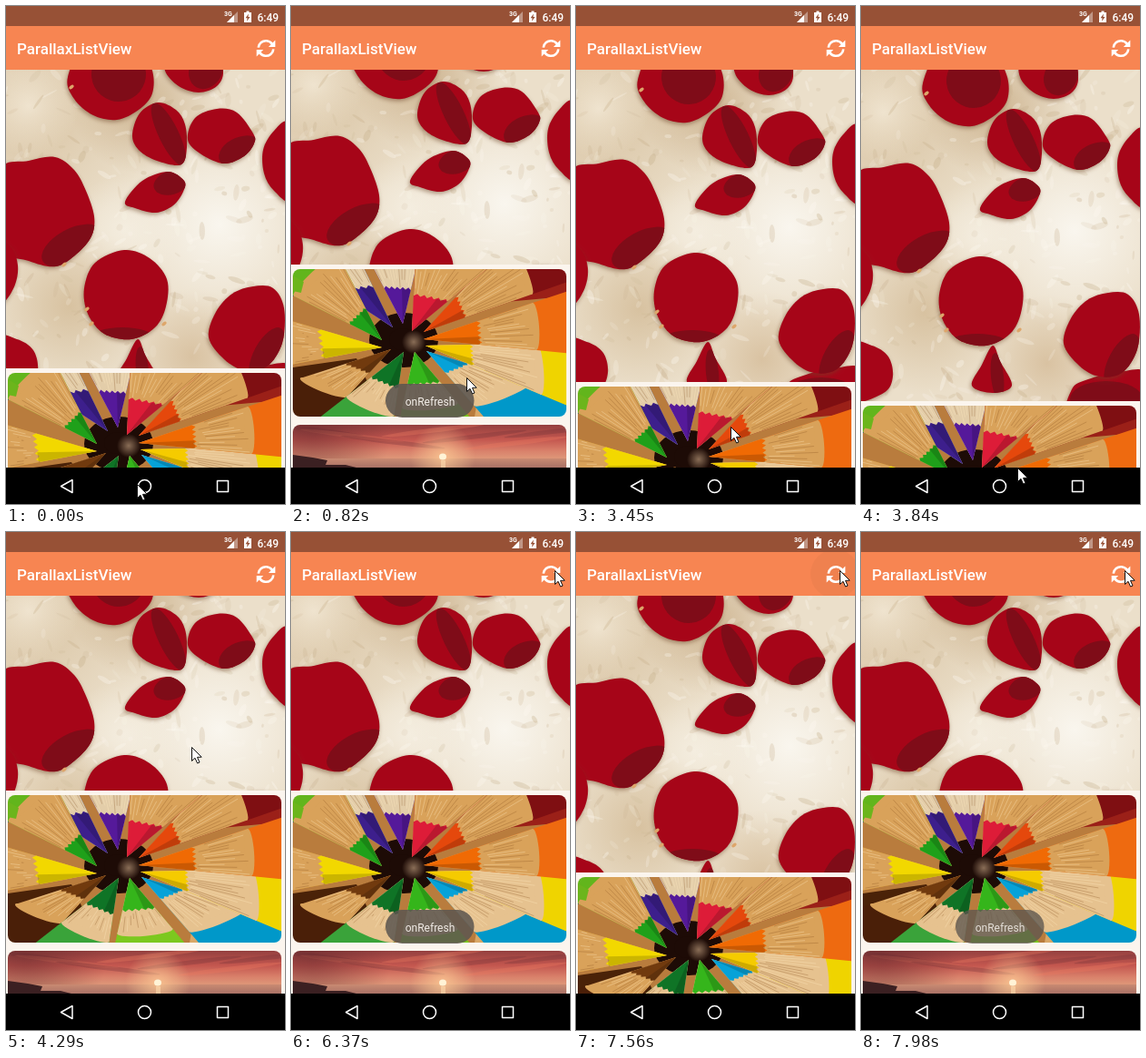
These frames come from a looping animation (307x547 px, 8 s). An HTML page with a canvas:

```html
<!DOCTYPE html>
<html lang="en">
<head>
<meta charset="utf-8">
<title>ParallaxListView</title>
<style>
html, body { margin: 0; width: 100%; height: 100%; overflow: hidden; background: #000; }
canvas { display: block; width: 307px; height: 547px; }
</style>
</head>
<body>
<canvas id="stage" width="307" height="547"></canvas>
<script>
const W = 307, H = 547, LOOP = 8000;
const REST = 284, TOP = 70, BOTTOM = 507, PULL = 114;
const ctx = document.getElementById('stage').getContext('2d');

// Bursts of movement: start, end, number of steps.
const BURSTS = [[150, 970, 7], [1940, 2910, 8], [3030, 3990, 8], [4140, 5100, 8],
  [5220, 5790, 5], [6370, 6760, 4], [7160, 7980, 7]];

// Header stretch in pixels, toast opacity and pointer position over time.
const STRETCH = [[0, 114], [150, 60], [287, 15], [423, 0], [3030, 0], [3441, 129], [3700, 150],
  [3990, 150], [4140, 50], [4277, 0], [7159, 0], [7160, 95], [7297, 140], [7433, 90], [7570, 30], [7707, 0]];
const TOAST = [[0, 0], [430, 0], [680, 1], [2500, 1], [2910, 0], [4280, 0], [4540, 1], [6360, 1],
  [6760, 0], [7710, 0], [7980, 0.88]];
const POINTER = [[0, 144, 525], [287, 144, 525], [970, 225, 330], [1850, 225, 330], [2494, 181, 198],
  [2910, 176, 190], [3030, 176, 192], [3441, 170, 462], [3700, 172, 507], [3990, 175, 507],
  [4277, 204, 236], [5100, 231, 147], [5790, 290, 42]];
const RIPPLE = [[0, 0], [7159, 0], [7160, 0.045], [7430, 0.03], [7700, 0]];

function snap(t) {
  let out = 0;
  for (const [a, b, n] of BURSTS) {
    if (t < a) break;
    const d = (b - a) / (n - 1);
    out = a + d * Math.min(n - 1, Math.floor((t + 8 - a) / d));
  }
  return out;
}

function at(keys, t, col = 1) {
  let i = 0;
  while (i < keys.length - 1 && keys[i + 1][0] <= t) i++;
  const p = keys[i], q = keys[i + 1];
  if (!q) return p[col];
  return p[col] + (q[col] - p[col]) * (t - p[0]) / (q[0] - p[0]);
}

function rng(seed) {
  return () => (seed = (seed * 16807) % 2147483647) / 2147483647;
}

function sheet(w, h, paint) {
  const c = document.createElement('canvas');
  c.width = w;
  c.height = h;
  paint(c.getContext('2d'));
  return c;
}

function poly(g, pts, fill) {
  g.beginPath();
  for (let i = 0; i < pts.length; i += 2) g.lineTo(pts[i], pts[i + 1]);
  g.closePath();
  g.fillStyle = fill;
  g.fill();
}

function oval(g, x, y, rx, ry, fill, turn = 0) {
  g.beginPath();
  g.ellipse(x, y, rx, ry, turn, 0, 7);
  g.fillStyle = fill;
  g.fill();
}

function glow(g, x, y, r, rgb, a) {
  const f = g.createRadialGradient(x, y, 0, x, y, r);
  f.addColorStop(0, `rgba(${rgb},${a})`);
  f.addColorStop(1, `rgba(${rgb},0)`);
  g.fillStyle = f;
  g.fillRect(x - r, y - r, 2 * r, 2 * r);
}

function fade(g, y0, y1, stops) {
  const f = g.createLinearGradient(0, y0, 0, y1);
  stops.forEach(([p, c]) => f.addColorStop(p, c));
  return f;
}

// Closed smooth curve through the points.
function smooth(g, p) {
  const n = p.length / 2;
  const pt = i => [p[2 * ((i + n) % n)], p[2 * ((i + n) % n) + 1]];
  g.beginPath();
  g.moveTo(p[0], p[1]);
  for (let i = 0; i < n; i++) {
    const [a, b, c, d] = [pt(i - 1), pt(i), pt(i + 1), pt(i + 2)];
    g.bezierCurveTo(b[0] + (c[0] - a[0]) / 6, b[1] + (c[1] - a[1]) / 6,
      c[0] - (d[0] - b[0]) / 6, c[1] - (d[1] - b[1]) / 6, c[0], c[1]);
  }
}

// Petal outline with an optional darker fold: [x, y, rx, ry, turn].
function petal(g, pts, fold) {
  g.save();
  g.shadowColor = 'rgba(110,70,40,.55)';
  g.shadowBlur = 5;
  g.shadowOffsetX = -1;
  g.shadowOffsetY = 2;
  smooth(g, pts);
  g.fillStyle = '#a60518';
  g.fill();
  g.restore();
  if (!fold) return;
  g.save();
  smooth(g, pts);
  g.clip();
  const [x, y, rx, ry, turn] = fold;
  oval(g, x, y, rx, ry, '#7f0c18', turn);
  g.restore();
}

const PHOTO_Y = 40;
const petals = sheet(W, 410, g => {
  const rnd = rng(77);
  g.translate(0, -PHOTO_Y);
  g.fillStyle = '#ebdfca';
  g.fillRect(0, PHOTO_Y, W, 410);
  glow(g, 30, 120, 130, '205,178,138', 0.6);
  glow(g, 150, 105, 80, '190,158,115', 0.65);
  glow(g, 70, 330, 90, '205,178,138', 0.65);
  glow(g, 205, 385, 75, '205,175,135', 0.6);
  glow(g, 235, 240, 110, '250,247,240', 0.95);
  glow(g, 25, 110, 55, '248,240,224', 0.7);
  glow(g, 130, 245, 60, '248,243,232', 0.7);
  for (let i = 0; i < 420; i++) {
    const x = rnd() * W, y = PHOTO_Y + rnd() * 410;
    const c = rnd() < 0.55 ? '255,252,244' : '196,172,136';
    oval(g, x, y, 2 + rnd() * 9, 1 + rnd() * 2.5, `rgba(${c},${0.1 + rnd() * 0.22})`, rnd() * 3);
  }

  petal(g, [90, 40, 140, 40, 160, 68, 161, 96, 146, 114, 122, 125, 96, 120, 75, 102, 68, 78], [124, 75, 30, 30, 0.3]);
  petal(g, [180, 55, 230, 50, 239, 72, 232, 88, 212, 95, 190, 88, 175, 71], [220, 70, 18, 22, 0.5]);
  petal(g, [167, 106, 187, 114, 197, 130, 199, 155, 193, 174, 169, 171, 148, 160, 139, 143, 147, 118], [179, 141, 11, 38, -0.45]);
  petal(g, [232, 113, 254, 117, 272, 140, 273, 151, 262, 165, 240, 173, 215, 163, 200, 147, 208, 123], [258, 160, 25, 16, -0.4]);
  petal(g, [131, 215, 150, 192, 178, 182, 196, 192, 195, 204, 184, 219, 165, 227, 142, 222], [182, 194, 20, 13, -0.3]);
  petal(g, [312, 128, 295, 137, 283, 158, 284, 184, 295, 203, 315, 214, 330, 170]);
  petal(g, [-8, 182, 25, 170, 54, 166, 75, 180, 88, 203, 97, 231, 94, 253, 78, 272, 55, 286, 25, 280, -8, 263], [72, 263, 36, 18, -0.5]);
  petal(g, [-12, 258, 6, 266, 13, 285, 10, 306, -2, 325, -15, 325]);
  petal(g, [130, 268, 158, 277, 177, 300, 176, 330, 164, 353, 138, 366, 108, 360, 90, 338, 86, 310, 98, 282], [128, 365, 35, 12, 0]);
  petal(g, [-10, 366, 12, 366, 30, 378, 35, 400, 25, 418, -10, 425]);
  petal(g, [145, 366, 153, 383, 166, 410, 145, 418, 122, 410, 133, 387], [150, 400, 7, 26, -0.1]);
  petal(g, [232, 414, 250, 403, 280, 396, 315, 396, 315, 445, 232, 445], [270, 425, 40, 20, 0]);
  petal(g, [272, 308, 294, 310, 306, 332, 304, 370, 287, 396, 262, 400, 240, 388, 223, 364, 231, 336, 249, 316], [287, 382, 14, 32, 0.5]);

  // pale petal roots
  [[94, 349], [174, 349], [89, 333], [64, 284], [72, 89]].forEach(([x, y]) => oval(g, x, y, 3, 1.8, '#dda66b', -0.6));
});

// Tip, two shoulders of the coloured point, wood length, colours of point and barrel.
const PENCILS = [
  [110, 64, 48, 24, 88, 19, 2.0, '#3d1f8c', '#173a8a'],
  [98, 78, 62, 60, 80, 43, 2.7, '#1fa01a', '#62b51c'],
  [98, 86, 29, 66, 34, 98, 1.55, '#f2d800', '#d99b22'],
  [108, 88, 58, 104, 84, 114, 2.0, '#713a0e', '#4a1f08'],
  [122, 91, 86, 119, 116, 131, 1.75, '#0f7426', '#3aa33a'],
  [134, 91, 126, 127, 162, 124, 1.7, '#35b51b', '#7cc81f'],
  [147, 90, 168, 114, 193, 104, 2.5, '#06a2d8', '#0098c9'],
  [146, 84, 196, 83, 198, 106, 2.45, '#f5cb00', '#efd400'],
  [144, 77, 204, 57, 206, 83, 2.0, '#f06a04', '#ee6a10'],
  [144, 69, 180, 30, 190, 53, 2.6, '#e5480c', '#7f0f12'],
  [121, 60, 100, 20, 130, 22, 2.2, '#55199a', '#55199a'],
  [131, 68, 133, 28, 171, 35, 2.1, '#dd1c38', '#a81226']
];

const pencils = sheet(301, 162, g => {
  const rnd = rng(31);
  g.fillStyle = '#b97c3d';
  g.fillRect(0, 0, 301, 162);
  poly(g, [0, 0, 30, 0, 70, 28, 0, 30], '#173a8a');
  poly(g, [0, 108, 70, 98, 100, 162, 0, 162], '#4a2208');
  poly(g, [200, 0, 301, 0, 301, 30, 190, 40], '#9b2018');
  poly(g, [210, 105, 301, 140, 301, 162, 200, 162], '#d9a868');
  oval(g, 122, 78, 38, 30, '#1d0b06');
  PENCILS.forEach(([x, y, ax, ay, bx, by, k, tip, barrel], i) => {
    const far = m => [x + (ax - x) * m, y + (ay - y) * m, x + (bx - x) * m, y + (by - y) * m];
    const wood = i > 3 && i < 8 ? '#e6c28f' : i % 5 === 0 ? '#e3cda9' : '#d9a25a';
    poly(g, [x, y, ...far(1).slice(0, 2), ...far(k).slice(0, 2), ...far(5).slice(0, 2),
      ...far(5).slice(2), ...far(k).slice(2)], barrel);
    poly(g, [x, y, ...far(k)], wood);
    const mid = far(k);
    oval(g, (mid[0] + mid[2]) / 2, (mid[1] + mid[3]) / 2,
      Math.hypot(mid[2] - mid[0], mid[3] - mid[1]) / 2, 5, wood, Math.atan2(mid[3] - mid[1], mid[2] - mid[0]));
    g.lineWidth = 0.8;
    for (let j = 0; j < 14; j++) {
      const u = (j + 0.5) / 14, m = 1 + rnd() * 0.3, e = k * (0.75 + rnd() * 0.25);
      const dx = ax + (bx - ax) * u - x, dy = ay + (by - ay) * u - y;
      g.strokeStyle = rnd() < 0.5 ? 'rgba(125,72,25,.35)' : 'rgba(255,232,190,.45)';
      g.beginPath();
      g.moveTo(x + dx * m, y + dy * m);
      g.lineTo(x + dx * e, y + dy * e);
      g.stroke();
    }
    // ragged edge between paint and wood
    const edge = [x, y];
    for (let j = 0; j <= 10; j++) {
      const u = j / 10, m = 0.97 + (j % 2) * 0.07;
      edge.push(x + (ax + (bx - ax) * u - x) * m, y + (ay + (by - ay) * u - y) * m);
    }
    poly(g, edge, tip);
    poly(g, [x, y, ...far(1).slice(2), (ax + 2 * bx) / 3, (ay + 2 * by) / 3], 'rgba(0,0,0,.16)');
  });
  poly(g, [0, 7, 12, 14, 9, 26, 0, 24], '#6cb51c');
  oval(g, 121, 77, 15, 12, '#1d0b06');
  glow(g, 133, 80, 13, '210,175,140', 0.6);
});

const sunset = sheet(301, 162, g => {
  g.fillStyle = fade(g, 0, 36, [[0, '#94403f'], [0.45, '#c4574f'], [0.8, '#d9816b'], [1, '#dd9477']]);
  g.fillRect(0, 0, 301, 37);
  for (let i = 0; i < 7; i++) {
    oval(g, 20 + i * 45, 5 + (i * 7) % 20, 58, 2.5, i % 2 ? 'rgba(235,120,95,.35)' : 'rgba(110,48,55,.3)', i < 3 ? 0.12 : -0.12);
  }
  glow(g, 20, 0, 90, '95,38,42', 0.55);
  g.fillStyle = fade(g, 37, 162, [[0, '#c98a72'], [0.12, '#99655f'], [1, '#4a3038']]);
  g.fillRect(0, 37, 301, 125);
  glow(g, 165, 35, 36, '255,205,150', 0.75);
  oval(g, 165, 35, 4, 3.5, '#fff3d6');
  g.fillStyle = 'rgba(255,220,175,.6)';
  g.fillRect(163, 39, 5, 14);
  poly(g, [0, 33, 22, 36, 38, 39, 36, 44, 58, 44, 70, 47, 80, 70, 0, 90], '#3b2022');
});

function card(img, y, h = 162) {
  ctx.save();
  ctx.beginPath();
  ctx.roundRect(2, y, 301, h, 8);
  ctx.clip();
  ctx.drawImage(img, 2, y);
  ctx.restore();
}

function label(s, x, y, font, fill = '#fff') {
  ctx.font = font + ' Roboto, sans-serif';
  ctx.fillStyle = fill;
  ctx.fillText(s, x, y);
}

function list(stretch) {
  ctx.save();
  ctx.beginPath();
  ctx.rect(0, TOP, W, BOTTOM - TOP);
  ctx.clip();
  ctx.fillStyle = '#fbf5ee';
  ctx.fillRect(0, TOP, W, BOTTOM - TOP);
  const edge = Math.round(REST + stretch);
  ctx.save();
  ctx.beginPath();
  ctx.rect(0, TOP, W, edge - TOP);
  ctx.clip();
  ctx.drawImage(petals, 0, Math.round(PHOTO_Y + 0.2 * (stretch - PULL)));
  ctx.restore();
  card(pencils, edge + 5);
  card(sunset, edge + 176);
  ctx.restore();
}

function refreshIcon() {
  ctx.save();
  ctx.translate(286, 46.5);
  ctx.strokeStyle = '#fff';
  ctx.lineWidth = 2.6;
  for (let i = 0; i < 2; i++) {
    ctx.beginPath();
    ctx.arc(0, 0, 8.3, Math.PI * 1.03, Math.PI * 1.8);
    ctx.stroke();
    poly(ctx, [10.3, -9, 10.3, -1.5, 2.8, -1.5], '#fff');
    ctx.rotate(Math.PI);
  }
  ctx.restore();
}

function bars(ripple) {
  ctx.fillStyle = '#975136';
  ctx.fillRect(0, 0, W, 22);
  ctx.fillStyle = '#f78552';
  ctx.fillRect(0, 22, W, 48);
  if (ripple > 0) {
    ctx.save();
    ctx.beginPath();
    ctx.rect(0, 22, W, 48);
    ctx.clip();
    oval(ctx, 285, 46, 27, 27, `rgba(0,0,0,${ripple})`);
    ctx.restore();
  }
  label('ParallaxListView', 12, 53, '500 17px');
  label('3G', 240, 11, 'bold 7px');
  label('6:49', 276.5, 17, '500 12px');
  poly(ctx, [255, 6, 255, 18, 243, 18], 'rgba(255,255,255,.4)');
  poly(ctx, [251, 10, 251, 18, 243, 18], '#fff');
  ctx.fillStyle = '#fff';
  ctx.fillRect(264.5, 5.5, 3, 2);
  ctx.fillRect(262, 7, 8, 11);
  poly(ctx, [267, 8.5, 263.5, 13.2, 265.6, 13.2, 265, 16.8, 268.5, 12, 266.4, 12], '#975136');
  refreshIcon();

  ctx.fillStyle = '#000';
  ctx.fillRect(0, BOTTOM, W, H - BOTTOM);
  ctx.strokeStyle = '#fff';
  ctx.lineWidth = 1.5;
  ctx.lineJoin = 'round';
  ctx.beginPath();
  ctx.moveTo(60.5, 527.5);
  ctx.lineTo(73, 520.5);
  ctx.lineTo(73, 534.5);
  ctx.closePath();
  ctx.moveTo(159.5, 527.5);
  ctx.arc(152.5, 527.5, 7, 0, 7);
  ctx.rect(232.5, 521.5, 12, 12);
  ctx.stroke();
}

function toast(a) {
  if (a <= 0) return;
  ctx.globalAlpha = a;
  ctx.beginPath();
  ctx.roundRect(104, 415, 97.5, 37, 18.5);
  ctx.fillStyle = 'rgba(92,86,80,.88)';
  ctx.fill();
  ctx.textAlign = 'center';
  label('onRefresh', 153, 438.5, '12px', '#f3eee8');
  ctx.textAlign = 'left';
  ctx.globalAlpha = 1;
}

function pointer(x, y) {
  ctx.save();
  ctx.translate(Math.round(x), Math.round(y));
  poly(ctx, [0.5, 0.5, 0.5, 15.5, 4, 12.3, 6.6, 18, 9, 17, 6.5, 11.4, 11.2, 11.2], '#fff');
  ctx.lineJoin = 'miter';
  ctx.strokeStyle = '#111';
  ctx.lineWidth = 1;
  ctx.stroke();
  ctx.restore();
}

function draw(now) {
  const t = snap(now % LOOP);
  list(at(STRETCH, t));
  bars(at(RIPPLE, t));
  toast(at(TOAST, t));
  pointer(at(POINTER, t), at(POINTER, t, 2));
}

let start;
function tick(now) {
  start ??= now;
  draw(now - start);
  requestAnimationFrame(tick);
}
draw(0);
requestAnimationFrame(tick);
</script>
</body>
</html>
```
